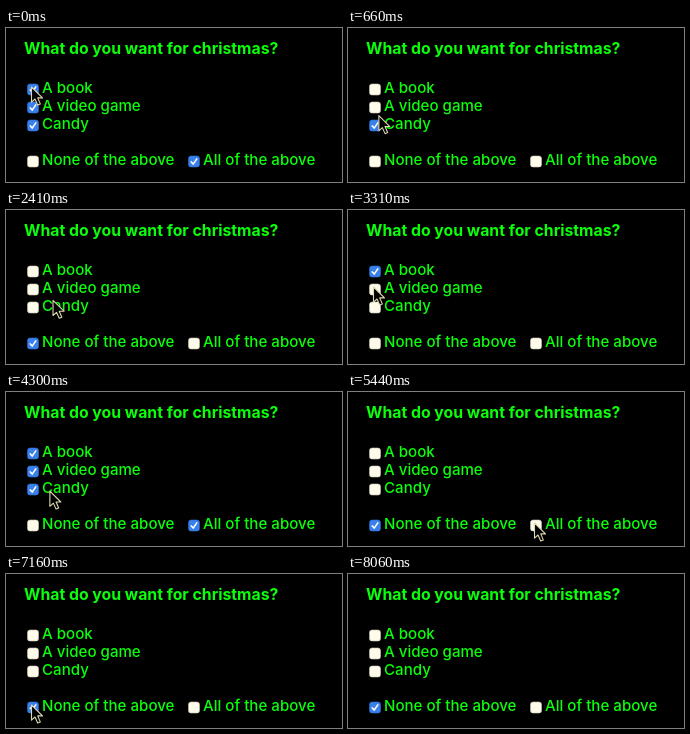
These frames come from a looping animation (336x154 px, 8.08 s). An HTML page:

```html
<!DOCTYPE html>
<html lang="en">
<head>
<meta charset="utf-8">
<style>
  html, body { margin: 0; width: 100%; height: 100%; overflow: hidden; background: #000; }
  svg { display: block; width: 336px; height: 154px; }
  text { font: 500 15.1px Inter, Roboto, sans-serif; fill: #0bff0b; }
  .title { font-weight: 700; font-size: 15.8px; }
  .box rect { fill: #fffbea; stroke: #c9c5b4; stroke-width: .6; }
  .box path { fill: none; stroke: #fff; stroke-width: 1.6; stroke-linecap: round; stroke-linejoin: round; visibility: hidden; }
  .on rect { fill: #3a80ea; stroke: #2f6fd6; }
  .on path { visibility: visible; }
  #cursor { fill: #000; stroke: #ddd6b0; stroke-width: 1.1; stroke-linejoin: round; }
</style>
</head>
<body>
<svg viewBox="0 0 336 154">
  <text class="title" x="18" y="26">What do you want for christmas?</text>
  <g id="options"></g>
  <path id="cursor" d="M0 0V15.2L3.5 12L6.2 18L8.8 16.9L6.2 10.9H11Z"/>
</svg>
<script>
const LOOP = 8080, LEFT = 21.5, RIGHT = 182.5;

const option = (label, x, row) => ({ label, x, y: 56 + 18 * row });
const book = option('A book', LEFT, 0);
const game = option('A video game', LEFT, 1);
const candy = option('Candy', LEFT, 2);
const none = option('None of the above', LEFT, 4);
const all = option('All of the above', RIGHT, 4);
const items = [book, game, candy];
const options = [...items, none, all];
const edge = { x: -2, y: 130 }, outside = { x: 276, y: 157 };

// Pointer visits: place, arrival, departure, click time
const visits = [
  [book, 0, 100, 80], [game, 400, 500, 460], [candy, 800, 1180, 930],
  [none, 1810, 1990], [book, 2790, 2960, 2850], [game, 3250, 3540, 3460],
  [candy, 3840, 4090, 4090], [all, 4780, 5830, 5000], [all, 5830, 5830, 5830],
  [edge, 6290, 6290], [none, 6810, 7160, 7160], [outside, 7960, LOOP]
].map(([place, arrive, leave, click]) => ({ place, arrive, leave, click }));

const group = document.getElementById('options');
group.innerHTML = options.map(({ label, x, y }) =>
  `<g class="box" transform="translate(${x} ${y})">
    <rect width="11" height="11" rx="2.6"/><path d="M2.8 5.9L4.7 8.1L8.3 2.9"/>
  </g><text x="${x + 14.5}" y="${y + 9}">${label}</text>`).join('');
const boxes = group.querySelectorAll('.box');
const cursor = document.getElementById('cursor');

// "None" and "All" follow the three items, and clicking them sets all three
function checkedAt(t) {
  let picked = new Set(items);
  for (const { place, click } of visits) {
    if (!(click <= t)) continue;
    if (place === all) picked = new Set(picked.size < 3 ? items : []);
    else if (place === none) picked.clear();
    else if (!picked.delete(place)) picked.add(place);
  }
  if (picked.size === 0) picked.add(none);
  if (picked.size === 3) picked.add(all);
  return picked;
}

function ease(u) {
  const a = u ** 2.5, b = (1 - u) ** 2.5;
  return a / (a + b);
}

// Moves within a column bow to the right
function pointerAt(t) {
  const i = visits.findLastIndex(v => v.arrive <= t);
  const { place: from, leave } = visits[i];
  const next = visits[i + 1];
  if (!next || t <= leave) return [from.x + 4, from.y + 3];
  const u = (t - leave) / (next.arrive - leave), e = ease(u);
  const dx = next.place.x - from.x, dy = next.place.y - from.y;
  const bow = .3 * Math.max(0, Math.abs(dy) - Math.abs(dx)) * Math.sin(Math.PI * u);
  return [from.x + 4 + dx * e + bow, from.y + 3 + dy * e];
}

const start = performance.now();
function frame() {
  const t = (performance.now() - start) % LOOP;
  const checked = checkedAt(t);
  boxes.forEach((box, i) => box.classList.toggle('on', checked.has(options[i])));
  cursor.setAttribute('transform', `translate(${pointerAt(t)})`);
  requestAnimationFrame(frame);
}
frame();
</script>
</body>
</html>
```
